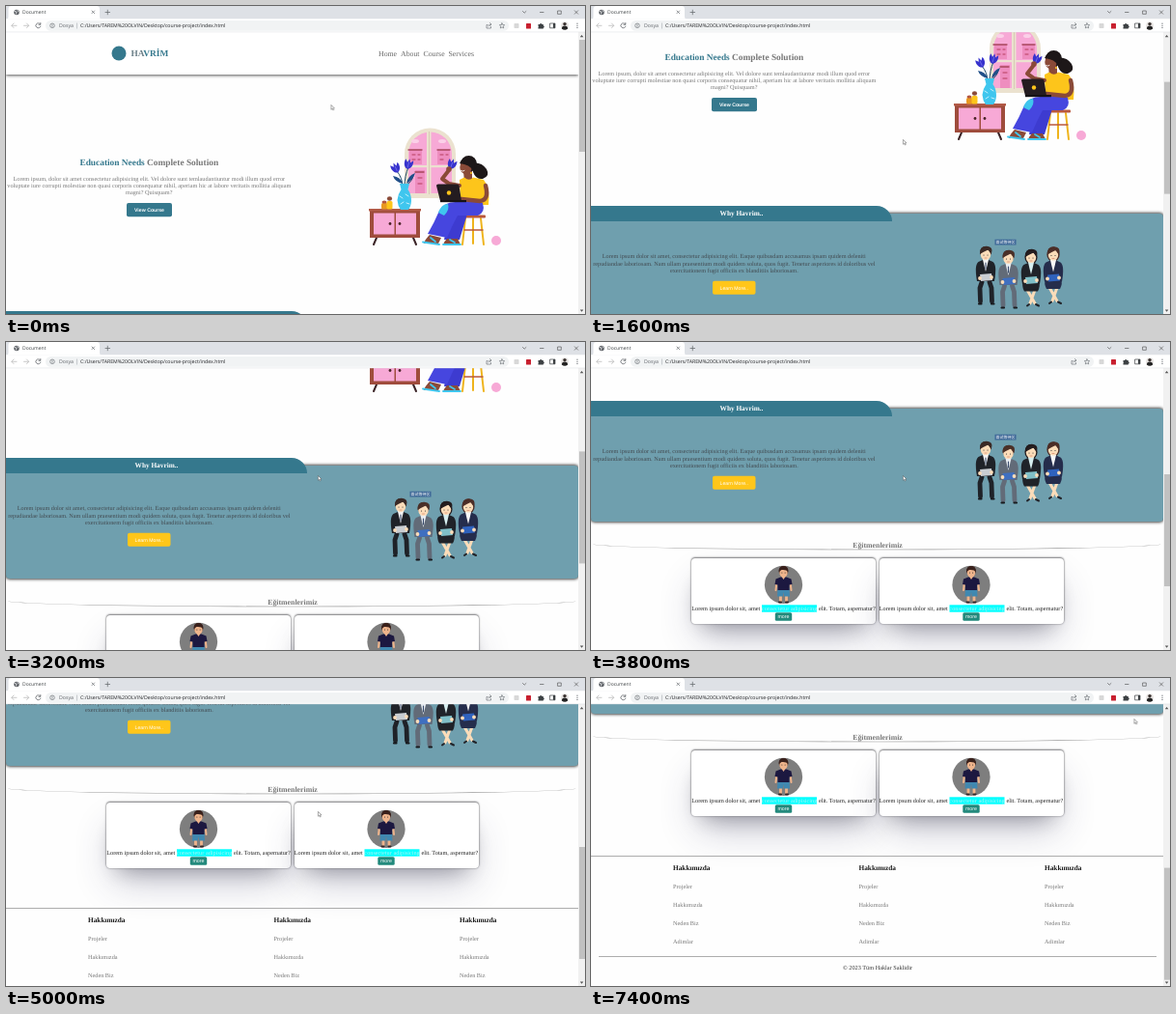
Write an HTML page that moves like this. It is 600 by 319 pixels and loops after 7700 ms.

```html
<!DOCTYPE html>
<html lang="tr">
<head>
<meta charset="utf-8">
<title>Document</title>
<style>
html, body { margin: 0; width: 100%; height: 100%; overflow: hidden; background: #fff; }
#stage { position: relative; width: 600px; height: 319px; overflow: hidden; background: #fefefe; }
#stage div, #stage svg { position: absolute; }
#view { left: 0; top: 27px; width: 593px; height: 292px; overflow: hidden; }
#page { left: 0; top: -27px; width: 593px; height: 723px; }
svg { left: 0; top: 0; overflow: visible; text-rendering: geometricPrecision; }
.head { left: 0; top: 27px; width: 593px; height: 43.5px; background: #fff; box-shadow: 0 1px 3px #555; }
.why { left: 0; top: 324px; width: 593px; height: 117px; background: #6f9fae; border-radius: 4px; box-shadow: 0 0 3px 1px #4a4a4a; }
.bar { left: 0; top: 316px; width: 312px; height: 16px; background: #35788d; border-radius: 0 16px 0 0; }
.card { top: 479px; width: 191px; height: 68px; background: #fff; border-radius: 4px;
  box-shadow: 0 -1px 2px rgba(70,70,75,.6), 0 0 1.5px .5px rgba(70,70,75,.4), 0 20px 39px -8px rgba(50,50,93,.3), 0 12px 23px -12px rgba(0,0,0,.35); }
.track { left: 593px; top: 27px; width: 7px; height: 292px; background: #f1f1f1; }
#thumb { left: 594px; top: 35px; width: 5.5px; height: 116px; background: #c1c1c1; }
</style>
</head>
<body>
<div id="stage">
  <div id="view"><div id="page">
    <div class="head"></div>
    <div class="why"></div>
    <div class="bar"></div>
    <div class="card" style="left:104px"></div>
    <div class="card" style="left:298.5px"></div>
    <svg id="art" width="593" height="723"></svg>
  </div></div>
  <div class="track"></div>
  <div id="thumb"></div>
  <svg id="chrome" width="600" height="319"></svg>
  <svg id="cursor" width="8" height="10"><path d="M.4 .4V5.2L1.5 4.200 2.300 6 3.200 5.600 2.400 3.900H3.900Z" fill="#fff" stroke="#555" stroke-width=".5"/></svg>
</div>
<script>
const SERIF = "'Liberation Serif', serif", SANS = "'Liberation Sans', sans-serif", UI = "'Open Sans', sans-serif";
const TEAL = '#35788d', GRAY = '#777', SKIN = '#8a4a38', BLUE = '#4646df', YELLOW = '#fdc51b', CYAN = '#3fc6ee';

const text = (x, y, size, str, fill = GRAY, o = {}) =>
  `<text x="${x}" y="${y}" font-size="${size}" fill="${fill}" font-family="${o.font || SERIF}" font-weight="${o.bold ? 700 : 400}" text-anchor="${o.mid ? 'middle' : 'start'}">${str}</text>`;
const rect = (x, y, w, h, fill, r = 0) => `<rect x="${x}" y="${y}" width="${w}" height="${h}" rx="${r}" fill="${fill}"/>`;
const dot = (x, y, r, fill, ry = r) => `<ellipse cx="${x}" cy="${y}" rx="${r}" ry="${ry}" fill="${fill}"/>`;
const path = (d, fill) => `<path d="${d}" fill="${fill}"/>`;
const line = (d, color, w = 1) => `<path d="${d}" fill="none" stroke="${color}" stroke-width="${w}" stroke-linecap="round" stroke-linejoin="round"/>`;
const rows = (x, y, lines, fill) => lines.map((s, i) => text(x, y + i * 7.2, 6.25, s, fill, MID)).join('');
const MID = { mid: true }, BOLD = { bold: true }, MIDBOLD = { mid: true, bold: true };

function header() {
  return dot(117, 49, 7.5, TEAL)
    + text(129.5, 52.3, 9.375, `<tspan fill="#6b7f88">HA</tspan>VRİM`, TEAL, BOLD)
    + [[386, 'Home'], [409, 'About'], [432.5, 'Course'], [458.5, 'Services']]
      .map(([x, s]) => text(x, 52, 7.8, s, '#666')).join('');
}

function hero() {
  return text(148.3, 164.8, 9.375, `<tspan fill="${TEAL}">Education Needs</tspan> Complete Solution`, '#777', MIDBOLD)
    + rows(148.3, 180.8, [
      'Lorem ipsum, dolor sit amet consectetur adipisicing elit. Vel dolore sunt temlaudantiuntur modi illum quod error',
      'voluptate iure corrupti molestiae non quasi corporis consequatur nihil, aperiam hic at labore veritatis mollitia aliquam',
      'magni? Quisquam?'], GRAY)
    + rect(125, 204, 47, 14.3, TEAL, 2)
    + text(148.5, 213.1, 5.2, 'View Course', '#fff', { font: SANS, ...MIDBOLD });
}

function archWindow() {
  return path('M413 198V153a26.5 26.5 0 0 1 53 0V198Z', '#ebe2cf')
    + path('M417 194V153a22.5 22.5 0 0 1 45 0V194Z', '#f7a9d6')
    + path('M418 164V149h13v15ZM447 164V149h13v15ZM424 194V170h10v24Z', '#ee8dbf')
    + line('M417 149H431M447 149H460M424 172h9', '#a8455c', 1.4)
    + line('M421 154h3m3 0h2M421 159h3m3 0h2M450 154h3m3 0h2M450 159h3M427 178h4M427 184h4', '#c9587f', 1.3)
    + dot(424, 140, 4, '#fbd0e8', 2) + dot(452, 140, 4, '#fbd0e8', 2)
    + rect(436, 128, 4.5, 68, '#ebe2cf') + rect(414, 165, 51, 2.2, '#ebe2cf')
    + rect(438, 130, .7, 65, '#cfc0a8') + rect(411, 195.5, 57, 3.5, '#ebe2cf');
}

function cabinet() {
  return line('M384 240 381 247M422 240 425 247', '#3a2326', 2)
    + rect(377, 210, 52, 30, '#9f4c3c') + rect(376, 210, 54, 2.5, '#b25a47')
    + rect(381, 214.5, 21.5, 22, '#f7a9d6') + rect(404, 214.5, 21, 22, '#f7a9d6')
    + dot(398, 225.5, 1.4, '#4a2226') + dot(408, 225.5, 1.4, '#4a2226')
    + rect(389, 204, 6.5, 6.500, '#e99822', 1.5) + rect(394.5, 202, 6, 8.500, YELLOW, 1.5)
    + dot(397.5, 199.5, 2.6, SKIN, 2.2) + dot(392, 203, 2.5, '#b4563f', 1.6);
}

function flower(x, y, turn) {
  return `<g transform="translate(${x} ${y}) rotate(${turn})">`
    + path('M0 5C-5 3-5-2-4-5L-1.5-2 0-6 1.5-2 4-5C5-2 5 3 0 5Z', '#3733cd')
    + line('M0 3V-2', '#7a78f0', .7) + '</g>';
}

function vase() {
  return line('M411 187Q411 178 405 171M413 187Q413 176 417 167M414 186Q421 182 422 176', '#1d4a68', 1)
    + path('M411 184Q403 182 401 176 409 177 411 184ZM415 184Q422 180 424 173 416 176 415 184Z', '#204f88')
    + flower(404, 168, -25) + flower(417, 164, 15)
    + path('M408 184H418L416.500 190Q420 195 420 202 419.500 208 417 211H409Q406 207 405.500 201 406 195 409.500 190Z', CYAN)
    + line('M408 197l3 2M414 195l3 2M409 205l3-2M415 204l3 1', '#e5faff', .8);
}

function woman() {
  const hair = '#1d1718';
  return line('M476 220 473 247M492 220 495 247M484 220V246', '#efb41c', 2)
    + line('M475 232H494', '#b9583c', 1.3) + rect(471, 216.5, 26, 3, '#b9583c', 1)
    // hair, face and neck
    + path('M483 163Q492 161 498 169 502 176 494 179 487 180 484 172Z', hair)
    + dot(479.5, 163.5, 8.5, hair, 8.5)
    + path('M474 171H483V182H475Z', SKIN) + dot(476.5, 167, 6.2, SKIN, 7.2)
    + path('M470 163Q473 156 481 158 488 163 484 171 481 164 470 163Z', hair)
    + line('M471.500 170.500q2 1.500 3.500 0', '#fff', .9) + dot(482, 173, 1, YELLOW)
    // shirt and raised arm
    + path('M470 180 475 177.500Q480 182 484 177.500L495 180Q502 188 500 206H471Z', YELLOW)
    + line('M470 186 459 184 452 179 459 170', SKIN, 4)
    + flower(462, 164, 20) + dot(459, 169, 2.8, SKIN)
    // legs and shoes
    + path('M479 212 470 242H454L461 212Z', '#3d3bd0')
    + path('M468 203Q482 200 494 204 497 214 489 217H468Q462 228 457 240L437 236Q444 224 449 212 455 202 468 203Z', BLUE)
    + path('M448 214Q451 205 458 205 460 211 454 217Z', CYAN)
    + path('M439 237 451 240 448 246H433Q434 242 439 237Z', SKIN) + path('M457 241H468L471 247H453Q454 244 457 241Z', SKIN)
    + line('M432 244.500 449 247M453 247H471M440 240l5 4M460 242l5 3', CYAN, 1.8)
    // near arm and laptop
    + line('M497 186Q501 201 491 202L472 200', SKIN, 4.5)
    + path('M446 186Q446 184.500 448 184.500H467Q469 184.500 469.500 186L472 202H450Z', '#241c20')
    + path('M450 201H477V203.200H450Z', '#161214')
    + dot(459, 193.5, 2.2, YELLOW)
    + dot(508, 243, 5, '#f7a9d6');
}

function whySection() {
  return text(156, 326, 7.31, 'Why Havrim..', '#fff', MIDBOLD)
    + rows(148.3, 370.3, [
      'Lorem ipsum dolor sit amet, consectetur adipisicing elit. Eaque quibusdam accusamus ipsam quidem deleniti',
      'repudiandae laboriosam. Nam ullam praesentium modi quidem soluta, quos fugit. Tenetur asperiores id doloribus vel',
      'exercitationem fugit officiis ex blanditiis laboriosam.'], '#424a50')
    + rect(126, 393.7, 44.5, 14, '#ffc61a', 2)
    + text(148.3, 402.5, 5.2, 'Learn More..', '#fff', { font: SANS, mid: true })
    + rect(418.5, 350.7, 22, 5.8, '#3d6797')
    + text(429.5, 355.1, 4, '面试等待区', '#fff', { mid: true, font: "'Noto Sans CJK SC', 'Noto Sans CJK', sans-serif" })
    + seated(409, 358, '#1f2228', '#f5f5f5', '#c9cdd2', '#3a2a26', false)
    + seated(432.5, 362, '#626b78', '#e8edf2', '#3f6fc0', '#4a3028', false)
    + seated(456, 361, '#202329', '#d7eff0', '#80bfc7', '#241d1f', true)
    + seated(479, 358.5, '#252d4c', '#f7f7f7', '#2f62bd', '#4b2d27', true);
}

function seated(x, top, suit, shirt, folder, hair, skirt) {
  const skin = '#fbdcb9';
  const legs = skirt
    ? line('M-4 42 4 56M4 42-1 56', skin, 3) + line('M5 57l3 1.500M-2 57l-2 1.500', '#22242a', 2)
      + path('M-8 33H8Q10 38 7 43.500H-7Q-10 38-8 33Z', suit)
    : line('M-4 37-6 43-5.500 57M4 37 6 43 6.500 57', suit, 4.800)
      + line('M-7 59.500h2.500M6 59.500h2.500', '#191a1e', 2.2);
  return `<g transform="translate(${x} ${top})">`
    + (skirt ? dot(0, 8, 6.6, hair, 7.5) : '')
    + legs
    + path('M-9 36Q-12 19-7.500 16L-3 14H3L7.500 16Q12 19 9 36Z', suit)
    + path('M-3.200 13H3.200L0 26Z', shirt)
    + (skirt ? '' : line('M0 17V23', '#394a6b', 1.1))
    + dot(0, 6, 6, hair, 6) + dot(0, 8.5, 5.2, skin, 5.5)
    + path('M-5.900 8Q-6.500-.5 1-.2T5.900 8Q4 6 2.500 3.500-2 5.500-5.900 8Z', hair)
    + dot(-2, 9, .55, '#333') + dot(2, 9, .55, '#333') + line('M-1 12h2', '#d2775f', .6)
    + path('M-6 29 6 28 7 35-5 36Z', folder)
    + dot(-6, 33, 1.9, skin) + dot(6, 32, 1.9, skin) + '</g>';
}

function boy(x) {
  const skin = '#efb48c', hair = '#3a211c', shirt = '#1c1840';
  return dot(x, 506.3, 19.6, '#7e7e7e') + `<g transform="translate(${x} 0)">`
    + line('M-7 503-8 512M7 503 8 512', skin, 2)
    + line('M-3 515V523M3 515V523', skin, 2.8)
    + line('M-4.500 524.500h2M2.500 524.500h2', '#33272b', 2)
    + path('M-6 510H6L6.500 518.500H.7L0 514-.7 518.500H-6.500Z', '#4088b0')
    + path('M-3 498.500H3L8 500.500 9 506 6 506.500V512H-6V506.500L-9 506-8 500.500Z', shirt)
    + path('M-2 498H2L0 501Z', skin)
    + dot(0, 492, 4.9, hair) + dot(0, 494, 4.2, skin, 4.6)
    + path('M-4.800 493Q-5 487 0 487T4.800 493Q3 490.500-2 491Z', hair)
    + dot(-1.6, 494, .5, '#222') + dot(1.6, 494, .5, '#222') + '</g>';
}

function teacher(left) {
  const x = left + 95.5;
  return boy(x)
    + rect(left + 73, 527.3, 57, 7.4, '#0ff')
    + text(x, 533, 6.25, 'Lorem ipsum dolor sit, amet <tspan fill="#b4f4f6">consectetur adipisicing</tspan> elit. Totam, aspernatur?', '#222', MID)
    + rect(x - 8.7, 535.2, 17.4, 8.6, '#22897c', 1.5)
    + text(x, 541.2, 5.3, 'more', '#fff', { font: SANS, mid: true });
}

function footer() {
  const links = ['Projeler', 'Hakkımızda', 'Neden Biz', 'Adimlar'];
  return rect(0, 588, 593, .8, '#999')
    + [85, 277.5, 470].map(x => text(x, 603, 7.31, 'Hakkımızda', '#1a1a1a', BOLD)
      + links.map((s, i) => text(x, 622.3 + i * 19, 6.25, s)).join('')).join('')
    + rect(8, 692, 578, .8, '#999')
    + text(297, 706.2, 6.25, '© 2023 Tüm Haklar Saklidir', '#333', MID);
}

function browser() {
  const ink = '#5f6368', pale = '#bbb';
  return rect(0, 0, 600, 13.5, '#dee1e6')
    + path('M0 13.500Q2.500 13.500 2.500 11V3Q2.500 0 5.500 0H94Q97 0 97 3V11Q97 13.500 99.500 13.500Z', '#fff')
    + dot(11, 6.5, 2.8, ink) + line('M9 5.500 11 6 10.500 8M12 4.500l1 1.500', '#fff', .7)
    + text(17, 8.3, 5, 'Document', '#3c4043', { font: UI })
    + line('M89 5l2.600 2.600m0-2.600-2.600 2.600', ink, .7)
    + line('M103 6.500h4.600M105.300 4.200v4.600', ink, .7)
    + line('M535.500 5.500l1.700 1.700 1.700-1.700M553.500 6.500h3.500M572 5h3.300v3.300H572ZM589.300 4.800l3.400 3.400m0-3.400-3.400 3.400', '#444', .6)
    + rect(0, 13.5, 600, 13.5, '#fff') + rect(0, 26.7, 600, .5, '#dadce0')
    + line('M11 20.300H6M8 18 5.800 20.300 8 22.600M18.500 20.300h5M21.500 18l2.200 2.300-2.200 2.300', pale, .8)
    + line('M35.300 18.600a2.500 2.500 0 1 0 .5 2.500M35.800 17.500v1.800h-1.800', ink, .8)
    + rect(41, 15, 480, 10.8, '#f1f3f4', 5.4)
    + `<circle cx="48" cy="20.300" r="2.300" fill="none" stroke="${ink}" stroke-width=".6"/>` + line('M48 20v1.300M48 19v.1', ink, .6)
    + text(55, 22.2, 5.2, 'Dosya', ink, { font: UI }) + rect(73, 17.5, .5, 6, '#9aa0a6')
    + text(77, 22.2, 5.2, 'C:/Users/TAREM%20OLVIN/Desktop/course-project/index.html', '#202124', { font: UI })
    + line('M499 19.500h-1v3.500h4.500v-1.500M499.500 21q.5-2 3-2m-1-1.500 1.500 1.500-1.500 1.500', ink, .6)
    + line('M514 17.800l.8 1.700 1.900.2-1.400 1.300.4 1.900-1.700-1-1.700 1 .4-1.900-1.400-1.300 1.900-.2Z', ink, .6)
    + rect(526.5, 18, 5, 5, '#d8d8d8', .8) + rect(539, 18, 5, 5.5, '#c8202f', .5)
    + path('M551.500 19h1.700a1 1 0 0 1 2 0h1.600v1.600a1 1 0 0 1 0 2V23.500h-5.300v-1.600a1 1 0 0 0 0-1.500Z', '#3c4043')
    + line('M564 18h5v4.800h-5Z', '#3c4043', .7) + rect(567, 18, 2, 4.8, '#3c4043')
    + dot(579, 20.3, 4, '#e9e6e4') + dot(579, 18.6, 1.7, '#39312f') + path('M575.800 23.500Q576 20.600 579 20.600T582.200 23.500Q579 26 575.800 23.500Z', '#222')
    + [18.2, 20.3, 22.4].map(y => dot(592, y, .6, ink)).join('')
    + path('M594.800 32.300h3.600L596.600 30ZM594.800 314.500h3.600L596.600 316.800Z', '#555');
}

document.getElementById('art').innerHTML = header() + hero() + archWindow() + cabinet() + vase() + woman() + whySection()
  + text(297, 467.7, 7.81, 'Eğitmenlerimiz', '#777', MIDBOLD)
  + path('M0 464A296.500 6.300 0 0 0 593 464A296.500 5.700 0 0 1 0 464Z', '#999')
  + teacher(104) + teacher(298.5) + footer();
document.getElementById('chrome').innerHTML = browser();

// Each step holds until the next one.
const LOOP = 7700;
const scroll = [[0, 0], [500, 14], [600, 42], [700, 68], [800, 77],
  [1500, 88], [1600, 109], [1700, 117], [1900, 124], [2000, 143], [2100, 166], [2200, 186], [2300, 196],
  [3500, 202], [3600, 218], [3700, 237], [3800, 255], [3900, 268], [4000, 274],
  [4600, 282], [4700, 304], [4800, 329], [4900, 345], [5000, 350],
  [5200, 360], [5300, 383], [5400, 399], [5500, 404]];
const pointer = [[0, 336.5, 102], [500, 333, 111], [600, 328, 126], [700, 324, 135], [800, 323, 138],
  [6300, 365, 123], [6400, 435, 96], [6500, 505, 70], [6600, 540, 56],
  [6900, 550, 49], [7000, 559, 44], [7100, 562.5, 42]];

function play(id, steps, place) {
  const frames = steps.map(([t, ...v]) => ({ offset: t / LOOP, transform: place(...v), easing: 'step-end' }));
  frames.push({ ...frames[frames.length - 1], offset: 1 });
  document.getElementById(id).animate(frames, { duration: LOOP, iterations: Infinity });
}
play('page', scroll, y => `translateY(${-y}px)`);
play('thumb', scroll, y => `translateY(${y * .4}px)`);
play('cursor', pointer, (x, y) => `translate(${x}px, ${y}px)`);
</script>
</body>
</html>
```
